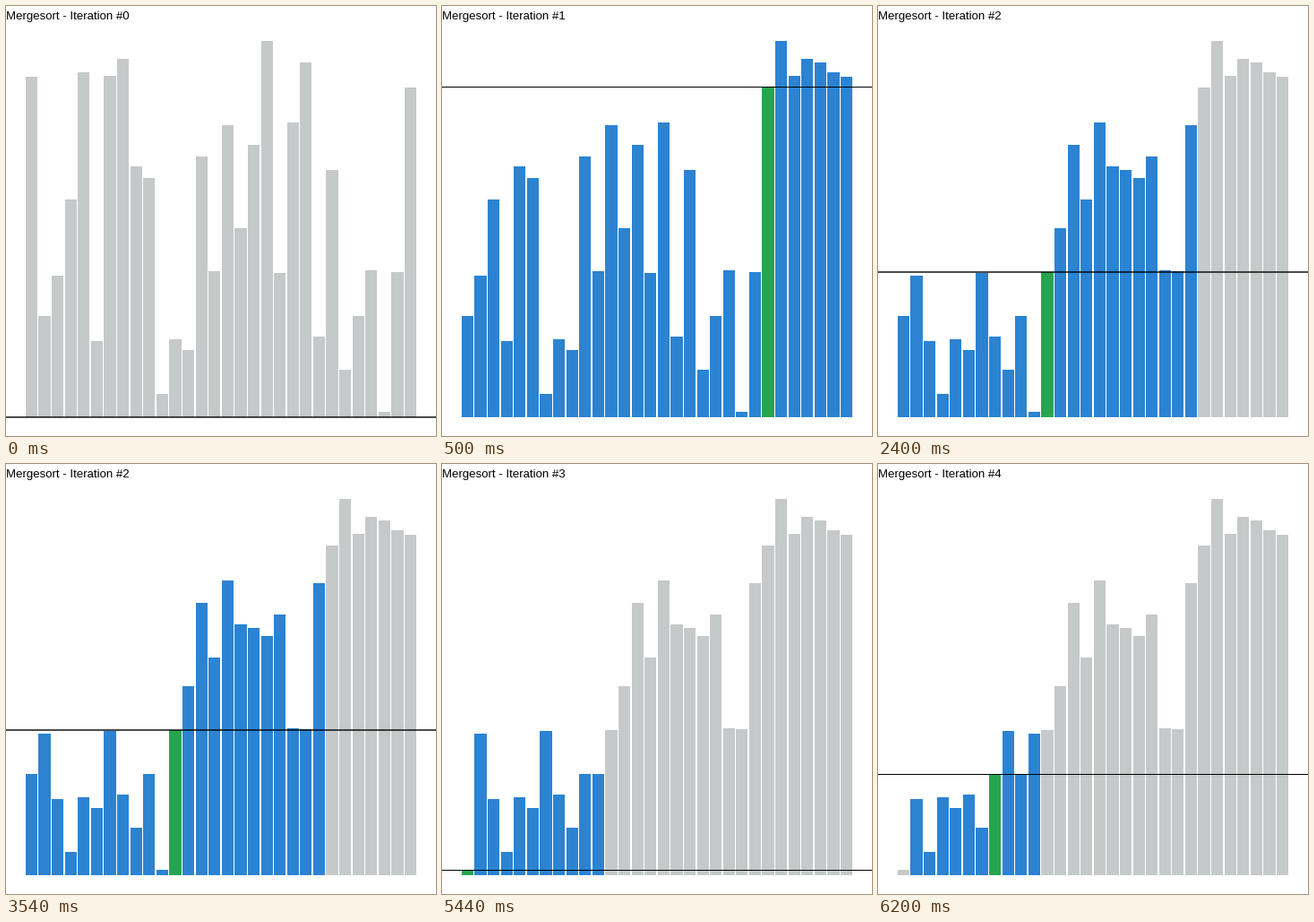
Recreate the animation shown at these times as a matplotlib script. Size 480 by 480 pixels, loop 8 s.

```python
import math

import matplotlib.pyplot as plt
from matplotlib.animation import FuncAnimation

SIZE, DPI = 480, 100
PX = 72 / DPI
BASE = 459
IDLE, ACTIVE, PIVOT = "#c6c9c9", "#2b83d2", "#26a550"
INTERVAL, FRAMES = 100, 80

# Top edge of each bar, measured down from the top of the stage.
TOPS = [79, 346.4, 301, 216, 74, 374, 78, 59, 179, 192, 433, 372, 384, 168, 296,
        133, 248, 155, 39, 298, 130, 63, 369, 183, 406, 346, 295, 453.4, 297, 90.6]


def partition(tops, lo, hi):
    """Lomuto partition with the last bar as pivot; returns the pivot's place."""
    store = lo
    for i in range(lo, hi):
        if tops[i] > tops[hi]:
            tops[store], tops[i] = tops[i], tops[store]
            store += 1
    tops[store], tops[hi] = tops[hi], tops[store]
    return store


def sort_steps(tops, lo, hi):
    """Yield (tops, colors, line) after every partition."""
    if lo >= hi:
        return
    mid = partition(tops, lo, hi)
    colors = [PIVOT if i == mid else ACTIVE if lo <= i <= hi else IDLE
              for i in range(len(tops))]
    yield tops[:], colors, tops[mid]
    yield from sort_steps(tops, lo, mid - 1)
    yield from sort_steps(tops, mid + 1, hi)


steps = [(TOPS, [IDLE] * len(TOPS), BASE), *sort_steps(TOPS[:], 0, len(TOPS) - 1)]

fig = plt.figure(figsize=(SIZE / DPI, SIZE / DPI), dpi=DPI, facecolor="white")
ax = fig.add_axes([0, 0, 1, 1])
ax.set(xlim=(0, SIZE), ylim=(SIZE, 0))
ax.axis("off")

lefts = [21.9 + 14.59 * i for i in range(len(TOPS))]
bars = [ax.add_patch(plt.Rectangle((round(x), BASE), round(x + 13.2) - round(x), 0, lw=0))
        for x in lefts]
line, = ax.plot([-2, SIZE + 2], [BASE, BASE], color="black", snap=False, zorder=3)
title = ax.text(-0.3, 15, "", fontname="Liberation Sans", fontsize=13.2 * PX,
                va="baseline", color="black")


def draw(frame):
    step = (frame * INTERVAL + 1400) // 1900
    tops, colors, level = steps[step]
    for bar, top, color in zip(bars, tops, colors):
        bar.set_y(round(top))
        bar.set_height(BASE - round(top))
        bar.set_facecolor(color)
    # A whole-pixel level straddles two rows, any other fills a single row.
    straddles = level == int(level)
    y = level if straddles else math.floor(level) + 0.5
    line.set_ydata([y, y])
    line.set_linewidth((1.4 if straddles else 1) * PX)
    title.set_text(f"Mergesort - Iteration #{step}")
    return [*bars, line, title]


anim = FuncAnimation(fig, draw, frames=FRAMES, interval=INTERVAL,
                     repeat=True, repeat_delay=0, blit=False)
plt.show()
```
